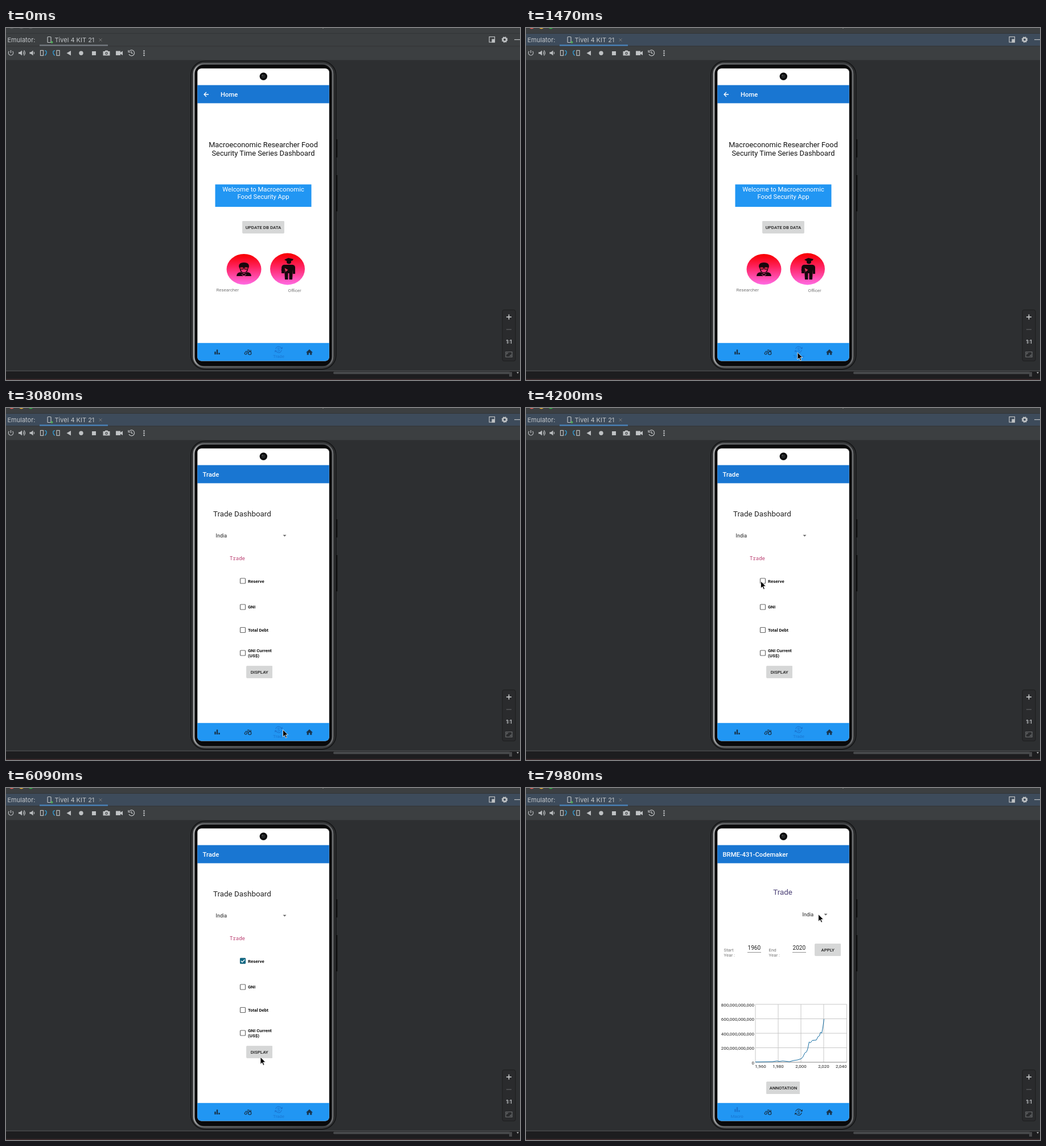
Recreate the animation shown at these times as an HTML page. Size 903 by 620 pixels, loop 8 s.

```html
<!DOCTYPE html>
<html lang="en">
<head>
<meta charset="utf-8">
<title>Emulator demo</title>
<style>
html, body { margin: 0; width: 100%; height: 100%; overflow: hidden; background: #2d2f31; }
svg { display: block; width: 903px; height: 620px; }
text { font: 7.88px Roboto, sans-serif; white-space: pre; }
.ide { font: 11px Inter, sans-serif; fill: #c3c6c9; }
.mid { text-anchor: middle; }
.end { text-anchor: end; }
.bar { font-size: 11.26px; font-weight: 500; fill: #fff; }
.btn { font-weight: 500; fill: #1c1c1c; text-anchor: middle; }
.head { font-size: 12.8px; text-anchor: middle; fill: #111; }
.big { font-size: 13.4px; }
.hello { font-size: 11.26px; text-anchor: middle; fill: #fff; }
.item { font-size: 9px; fill: #222; }
.bold { font-weight: 700; fill: #111; }
.dim { fill: #757575; }
.year { font-size: 10.1px; fill: #222; }
.axis { font-size: 7.95px; fill: #222; }
.mono { font: 11px "Noto Sans Mono", monospace; fill: #8f9398; }
.icon { fill: none; stroke: #bfc2c4; stroke-width: 1.2; }
.solid { fill: #bfc2c4; }
.key { fill: #d6d7d7; filter: drop-shadow(0 .5px .6px #0004); }
.box { fill: #fff; stroke: #666; stroke-width: 1.2; }
</style>
</head>
<body>
<svg viewBox="0 0 903 620">
  <defs>
    <linearGradient id="badge" x2="0" y2="1">
      <stop offset=".05" stop-color="#f90008"/><stop offset=".45" stop-color="#ff2565"/><stop offset="1" stop-color="#ff6be4"/>
    </linearGradient>
    <linearGradient id="metal">
      <stop stop-color="#a6a8a9"/><stop offset=".05" stop-color="#66686a"/><stop offset=".95" stop-color="#434548"/><stop offset="1" stop-color="#6c6e70"/>
    </linearGradient>
    <clipPath id="glass"><rect x="336.300" y="71.300" width="231.500" height="515.200" rx="7"/></clipPath>
    <g id="macroIcon"><path d="M-4.700-1h2.400v5h-2.400zM-1.200-4.500h2.400V4h-2.400zM2.300 1h2.400v3H2.300z"/></g>
    <g id="farmIcon" fill="none" stroke="currentColor" stroke-width="1.200">
      <circle cx="-3.800" cy="2" r="2"/><circle cx="3.200" cy="1.700" r="2.700"/>
      <path d="M-4.500-1.500h4l1 3M-1-3.700h3l1 2.500h3M5-4v3"/>
    </g>
    <g id="tradeIcon" fill="none" stroke="currentColor">
      <circle r="5.300" stroke-width="1.200" stroke-dasharray="13.600 3.050" transform="rotate(8)"/>
      <path d="M2-1.600Q1-3-.8-2.600T-.8-.2L.9.200Q2.400 1 1.200 2.300T-2 1.600"/>
      <path d="M6.800-5v3.800H3zM-6.800 5V1.200H-3z" fill="currentColor" stroke="none"/>
    </g>
    <g id="homeIcon"><path d="M0-5L6 .4H4.300V4.800H1.200V1.300H-1.200V4.800H-4.300V.4H-6z"/></g>
  </defs>

  <!-- IDE window -->
  <rect width="903" height="620" fill="#2d2f31"/>
  <rect width="903" height="56.500" fill="#3c3f41"/>
  <rect id="tabBar" y="10" width="903" height="21.500"/>
  <path d="M0 9.500H903M0 32H903" stroke="#323436"/>
  <g id="lights"><circle cx="10" cy="-4" r="5.500"/><circle cx="27" cy="-4" r="5.500"/><circle cx="43.500" cy="-4" r="5.500"/></g>
  <path d="M556 0h2" stroke="#aaa"/>
  <text class="ide" x="2.500" y="24.500">Emulator:</text>
  <text class="ide" x="85.500" y="24.500">Tivel 4 KIT 21</text>
  <rect id="tabLine" x="59" y="29.300" width="120" height="2.400"/>
  <g class="icon">
    <rect x="73" y="15.500" width="6" height="10" rx="1"/><path d="M163.500 18.500l5 5m0-5l-5 5" stroke="#777" stroke-width="1"/>
    <rect x="849" y="15.500" width="9.500" height="9.500"/><path class="solid" d="M854 20h4v5h-4z"/>
    <circle cx="876" cy="20.500" r="3.200" stroke-width="2.600"/><circle cx="876" cy="20.500" r="4.800" stroke-dasharray="2 1.770"/>
    <path d="M893 20.500h10"/>
    <path d="M8.500 39v5M5.500 41a4.200 4.200 0 1 0 6 0"/>
    <path d="M30 41.500q2 2.500 0 5M31.500 39.500q4 4.500 0 9M49 42q1.500 2 0 4"/>
    <rect x="60.500" y="39.500" width="5" height="9"/><rect x="89" y="39.500" width="5" height="9"/>
    <path d="M68 40q4 0 3 4t-3 4M86 40q-4 0-3 4t3 4" stroke="#3592c4" stroke-width="1.600"/>
    <path d="M216.500 41a5 5 0 1 1-.5 5M215 39v3.500h4M220.500 41v3.500h2.500"/>
  </g>
  <g class="solid">
    <circle cx="80.500" cy="25" r="2" fill="#4fae59"/>
    <path d="M22 42.500h2.500l3.500-3v9l-3.500-3H22zM41.500 42.500H44l3.500-3v9l-3.500-3h-2.500zM114 40v8.500l-7.500-4.200z"/>
    <circle cx="132" cy="44.300" r="3.700"/><path d="M151 41h7v7h-7zM193 40.500h8v7.500h-8zM201 43l4-2.500v7.500l-4-2.500z"/>
    <path d="M170.500 41h3l1-1.500h4l1 1.500h3v7.500h-12z"/><circle cx="176.500" cy="44.600" r="2.300" fill="#3c3f41"/><circle cx="176.500" cy="44.600" r="1.200"/>
    <circle cx="242.500" cy="40.500" r="1.300"/><circle cx="242.500" cy="44.300" r="1.300"/><circle cx="242.500" cy="48.100" r="1.300"/>
  </g>
  <rect x="872" y="496.500" width="23" height="90" rx="3" fill="#2a2b2d" stroke="#1d1e1f"/>
  <path d="M879 509h9M883.500 504.500v9" stroke="#d0d2d3" stroke-width="1.500"/>
  <path d="M879 531h9M878 570.500h11v9h-11zM880 575v-2.500h2.500M887 575v2.500h-2.500" fill="none" stroke="#6c6e70" stroke-width="1.200"/>
  <text class="ide mid" x="883.500" y="556" style="font-size:8.500px;font-weight:700">1:1</text>
  <rect y="604" width="903" height="16" fill="#1d1d1f"/>
  <path d="M0 604H903" stroke="#595b5d"/>
  <path d="M577 607.500H884" stroke="#494b4d" stroke-width="4" stroke-linecap="round"/>
  <path d="M0 619H903" stroke="#38292b" stroke-width="2"/>
  <path d="M884 606h5v8h-5z" fill="#48494b"/><path d="M897 606h4l-2 3z" fill="#aaa"/>
  <rect id="blip" x="884" y="606" width="5" height="4" fill="#77797b"/>
  <text id="log" class="mono" x="-5" y="613">361007201,0.3218934914,-4628652265,17.62020695,4.809364049,127.614592,132.8960089,137824626256,7.696682153,2.937129131,614462626622,</text>

  <!-- Phone -->
  <path d="M581 196v32M581 259v64" stroke="#111" stroke-width="2.500"/>
  <rect x="324.500" y="58" width="255.500" height="543.500" rx="25" fill="#1c1d1e" stroke="#111213"/>
  <rect x="326.500" y="60" width="251.500" height="539.500" rx="23" fill="none" stroke="#3f4143"/>
  <rect x="330" y="63" width="244" height="534" rx="18" fill="#09090a" stroke="url(#metal)" stroke-width="3"/>
  <g clip-path="url(#glass)">
    <rect x="336" y="71" width="233" height="516" fill="#fff"/>
    <rect x="336" y="100.600" width="233" height="31.900" fill="#1976d2"/>
    <rect x="336" y="554.800" width="233" height="32" fill="#2196f3"/>

    <g id="home">
      <text class="head" x="452" y="209.500">Macroeconomic Researcher Food</text>
      <text class="head" x="452" y="225">Security Time Series Dashboard</text>
      <rect x="367.500" y="275.500" width="169" height="39.500" fill="#2196f3"/>
      <text class="hello" x="452" y="287.500">Welcome to Macroeconomic</text>
      <text class="hello" x="452" y="301">Food Security App</text>
      <rect class="key" x="415.500" y="340" width="73" height="21.500" rx="1"/>
      <text class="btn" x="452" y="353.500">UPDATE DB DATA</text>
      <ellipse cx="418" cy="425" rx="30.500" ry="27" fill="url(#badge)"/>
      <ellipse cx="494.500" cy="424.500" rx="30.500" ry="28" fill="url(#badge)"/>
      <g fill="#17080c">
        <path d="M409 420q0-7 9-7t9 7l-1 3h-16z"/>
        <path d="M405 437q0-6 7-7l6 3 6-3q7 1 7 7z"/>
        <path d="M411 421h6v4h-6zM419 421h6v4h-6z" fill="#d22545" stroke="#17080c"/>
        <path d="M412 425q0 6 6 6t6-6" fill="none" stroke="#17080c" stroke-width="1.500"/>
        <path d="M414 434l4 3 4-3" fill="none" stroke="#ff55a8"/>
        <path d="M489 408l7-3 9 2-2 3h-11z"/><circle cx="497" cy="411.500" r="4"/>
        <path d="M488 417h16q4 1 4 5v11h-4v-8l-1 18h-5.500v-11h-2v11H490l-1-18v7h-5v-9q0-5 4-6z"/>
        <path d="M483 426l6 2M489 422l7 4-5 4z" fill="#e2365b" stroke="#17080c" stroke-width=".7"/>
      </g>
      <text class="dim" x="369.500" y="464">Researcher</text>
      <text class="dim" x="495.500" y="464.500">Officer</text>
    </g>

    <g id="form">
      <text class="big" x="364" y="191" fill="#222">Trade Dashboard</text>
      <text class="item" x="368.500" y="228">India</text>
      <path d="M486.500 223.500h6l-3 3z" fill="#666"/>
      <text class="mono" x="393" y="268" style="font-size:9px;fill:#b8386c">Trade</text>
      <g class="box">
        <rect x="411.500" y="300" width="9" height="9" rx="1"/><rect x="411.500" y="346" width="9" height="9" rx="1"/>
        <rect x="411.500" y="386.500" width="9" height="9" rx="1"/><rect x="411.500" y="427" width="9" height="9" rx="1"/>
      </g>
      <g id="check"><rect x="411" y="299.500" width="10" height="10" rx="1" fill="#0f6884"/><path d="M412.800 304.500l2.200 2.300 4.400-4.600" fill="none" stroke="#fff" stroke-width="1.300"/></g>
      <text class="bold" x="425" y="307.500">Reserve</text>
      <text class="bold" x="425" y="353">GNI</text>
      <text class="bold" x="425" y="394">Total Debt</text>
      <text class="bold" x="425" y="430">GNI Current</text>
      <text class="bold" x="425" y="439">(US$)</text>
      <rect class="key" x="422.500" y="454.500" width="45.500" height="21" rx="1"/>
      <rect id="press" x="422.500" y="454.500" width="45.500" height="21" rx="1" fill="#0002"/>
      <text class="btn" x="445.200" y="467.500">DISPLAY</text>
    </g>

    <g id="chart">
      <text class="big mid" x="451" y="188" fill="#4b4076">Trade</text>
      <text class="item" x="485.500" y="226">India</text>
      <path d="M523.500 221.500h6l-3 3z" fill="#666"/>
      <text class="dim" x="347.500" y="288">Start</text><text class="dim" x="347.500" y="297">Year :</text>
      <text class="dim" x="426.500" y="288">End</text><text class="dim" x="426.500" y="297">Year :</text>
      <text class="year" x="389.500" y="285">1960</text><text class="year" x="468.500" y="285">2020</text>
      <path d="M389 289.500h24M468 289.500h24" stroke="#777" stroke-width=".8"/>
      <rect class="key" x="507.500" y="274.500" width="45.500" height="21" rx="1"/>
      <text class="btn" x="530.200" y="287.700">APPLY</text>
      <path d="M403 381H563.500V483M403 406.500H563.500M403 432H563.500M403 457.500H563.500M443 381V483M483 381V483M523 381V483M403 381V483" fill="none" stroke="#c2c2c2" stroke-width=".9"/>
      <path d="M403 483H563.500" stroke="#888" stroke-width="1.200"/>
      <path d="M403 482.500L433 482 441 480.800 445 481.600 451 480.800 463 482 470 480 477 479 483 477 486 474.500 490 466.500 493 464.500 495 459 497.500 447 499.500 449 503 444.500 510 444 513 438 515.500 436.500 517.500 430 519.500 432 521.500 422 523.500 407" fill="none" stroke="#176ea3"/>
      <g id="axes"></g>
      <rect class="key" x="422.500" y="517.500" width="58.500" height="21.500" rx="1"/>
      <text class="btn" x="452" y="531">ANNOTATION</text>
    </g>

    <path id="back" d="M356 117h-8m4-4l-4 4 4 4" fill="none" stroke="#fff" stroke-width="1.300"/>
    <text id="title" class="bar" y="121"></text>
    <circle id="ripple" cx="479" cy="571" r="12" fill="#0d47a1"/>
    <g id="macro"><use href="#macroIcon"/></g>
    <use href="#farmIcon" x="425" y="571" color="#17344d"/>
    <g id="trade"><use href="#tradeIcon"/></g>
    <use href="#homeIcon" x="533" y="571" fill="#17344d"/>
    <text id="label" class="mid" y="581" fill="#1976d2"></text>
  </g>
  <circle cx="452.300" cy="85.300" r="6.700" fill="#0c0c0d"/><circle cx="452.300" cy="85.300" r="3.200" fill="#242729"/><circle cx="450.500" cy="83.500" r="1" fill="#666"/>

  <g id="pointer">
    <g id="ring" fill="none"><circle cy=".5" r="18" fill="#0001" stroke="#fff" stroke-width="3"/><circle cy=".5" r="18" stroke="#161616" stroke-width="1.500"/></g>
    <path d="M0 0V12.500L2.900 9.800 4.900 14.400 6.900 13.500 4.900 9H8.900Z" fill="#000" stroke="#fff" stroke-width=".8"/>
  </g>
</svg>
<script>
const el = id => document.getElementById(id);
const LOOP = 8000, STEP = 70;
const clamp = v => Math.max(0, Math.min(1, v));
const within = (t, from, to) => t >= from && t < to;
const fade = (id, v) => el(id).setAttribute("opacity", v);
const show = (id, on) => fade(id, on ? 1 : 0);

// time, x, y of the pointer tip
const path = [
  [210, 452, 440], [770, 478, 573], [1330, 478, 573], [1470, 477, 571.5],
  [2870, 477, 571.5], [3290, 496, 562], [3430, 416, 299], [3500, 416, 299],
  [3920, 412.5, 305], [4410, 412.5, 305], [4480, 412.5, 306], [5390, 412.5, 306],
  [6090, 447, 474], [7210, 447, 474], [7840, 514, 222.5], [7910, 514, 222.5], [7980, 513.7, 222.5]
];

function pointerAt(t) {
  let i = 0;
  while (i < path.length - 2 && t > path[i + 1][0]) i++;
  const [a, b] = [path[i], path[i + 1]];
  const k = clamp((t - a[0]) / (b[0] - a[0])), e = k * k * (3 - 2 * k);
  return [a[1] + (b[1] - a[1]) * e, a[2] + (b[2] - a[2]) * e];
}

function buildAxes() {
  const label = (cls, x, y, s) => `<text class="axis ${cls}" x="${x}" y="${y}">${s}</text>`;
  const xs = [412, 443, 483, 523, 553.7];
  el("axes").innerHTML = xs.map((x, i) =>
    label("mid", x, 493.3, (1960 + 20 * i).toLocaleString("en-US")) +
    label("end", 401, 486.5 - 25.4 * i, (2e11 * i).toLocaleString("en-US"))).join("");
}

function navItem(id, x, selected) {
  const color = selected ? "#1976d2" : "#17344d";
  el(id).setAttribute("transform", `translate(${x} ${selected ? 566.5 : 571})`);
  el(id).setAttribute("fill", color);
  el(id).setAttribute("color", color);
}

function draw(time) {
  const t = Math.floor(time % LOOP / STEP) * STEP;
  const focused = t >= 910, onTrade = t >= 2520, onChart = t >= 6720;

  el("tabBar").setAttribute("fill", focused ? "#3d4b5b" : "#3c3f41");
  el("tabLine").setAttribute("fill", focused ? "#4a82b8" : "#747a80");
  const lights = t >= 840 ? ["#ff5f57", "#febc2e", "#28c840"] : ["#55585a", "#55585a", "#55585a"];
  lights.forEach((c, i) => el("lights").children[i].setAttribute("fill", c));

  const toForm = clamp((t - 2450) / 300), toChart = clamp((t - 6650) / 210);
  fade("home", 1 - toForm);
  fade("form", toForm * (1 - toChart));
  fade("chart", toChart);

  show("back", !onTrade);
  el("title").textContent = onChart ? "BRME-431-Codemaker" : onTrade ? "Trade" : "Home";
  el("title").setAttribute("x", onTrade ? 345.5 : 377);
  navItem("macro", 371, onChart);
  navItem("trade", 479, !onChart);
  el("label").textContent = onChart ? "Macro" : "Trade";
  el("label").setAttribute("x", onChart ? 370.7 : 479);
  fade("ripple", within(t, 2520, 2800) ? .25 * (2800 - t) / 280 : 0);

  fade("check", clamp((t - 5250) / 140));
  show("press", within(t, 6440, 6580));
  show("log", within(t, 6790, 7420));
  show("blip", within(t, 4620, 5040));

  show("pointer", t >= 210);
  el("pointer").setAttribute("transform", `translate(${pointerAt(t)})`);
  show("ring", within(t, 840, 910) || within(t, 4060, 4200) || within(t, 6160, 6440));
}

buildAxes();
const start = performance.now();
(function loop() {
  draw(performance.now() - start);
  requestAnimationFrame(loop);
})();
</script>
</body>
</html>
```
